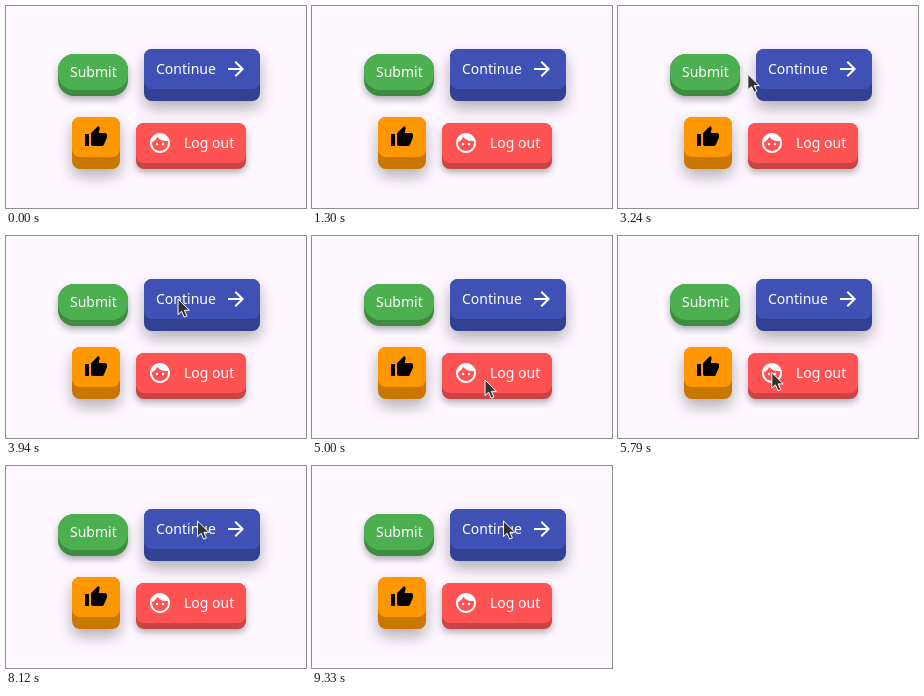
An HTML page for the animation above (9360 ms loop, 300x202 px).

```html
<!DOCTYPE html>
<html lang="en">
<head>
<meta charset="utf-8">
<title>Push buttons</title>
<style>
  html, body { margin: 0; width: 100%; height: 100%; overflow: hidden; background: #fef7ff; }
  .side, .front, .front svg, .front span, #cursor { position: absolute; }
  .front { left: 0; top: 0; width: 100%; border-radius: inherit; color: #fff; }
  .front span { left: 12px; font: 14px/36px "Noto Sans", sans-serif; white-space: pre; }
  .front svg { width: 24px; height: 24px; top: 8px; fill: currentColor; }
  #cursor { left: 0; top: 0; width: 16px; height: 22px; overflow: visible; }
</style>
</head>
<body>
<svg id="cursor"><path d="M0 0V15.6L3.6 12.3 6.2 18.2 8.9 17 6.4 11.3H11.4Z" fill="#333" stroke="#fff" stroke-linejoin="round"/></svg>
<script>
const LOOP = 9360, RAMP = 90;
const ARROW = 'M12 4l-1.41 1.41L16.17 11H4v2h12.17l-5.58 5.59L12 20l8-8z';
const THUMB = 'M1 21h4V9H1v12zm22-11c0-1.1-.9-2-2-2h-6.31l.95-4.57.03-.32c0-.41-.17-.79-.44-1.06L14.17 1 7.59 7.59C7.22 7.95 7 8.45 7 9v10c0 1.1.9 2 2 2h9c.83 0 1.54-.5 1.84-1.22l3.02-7.05c.09-.23.14-.47.14-.73v-2z';
const FACE = 'M10.25 13a1.25 1.25 0 1 1-2.5 0 1.25 1.25 0 0 1 2.5 0zm6 0a1.25 1.25 0 1 1-2.5 0 1.25 1.25 0 0 1 2.5 0zM12 2C6.48 2 2 6.48 2 12s4.48 10 10 10 10-4.48 10-10S17.52 2 12 2zm0 18c-4.41 0-8-3.59-8-8 0-.29.02-.58.05-.86 2.36-1.05 4.23-2.98 5.21-5.37C11.07 8.33 14.05 10 17.42 10c.78 0 1.53-.09 2.25-.26.21.71.33 1.47.33 2.26 0 4.41-3.59 8-8 8z';

// clicks: [press, release] in ms
const buttons = [
  { x: 52, y: 48, w: 70, h: 36, depth: 6, r: 16, face: '#4caf50', side: '#3d8c40', text: 'Submit', clicks: [[2600, 2800]] },
  { x: 138, y: 43, w: 116, h: 40, depth: 12, r: 8, face: '#3f51b5', side: '#324191', text: 'Continue', icon: ARROW, iconX: 80, clicks: [[3600, 3790], [7800, 8000]] },
  { x: 66, y: 111, w: 48, h: 40, depth: 12, r: 8, face: '#ff9800', side: '#c87700', icon: THUMB, iconX: 12, ink: '#000', clicks: [[6290, 6480]] },
  { x: 130, y: 117, w: 110, h: 40, depth: 6, r: 8, face: '#ff5252', side: '#c94545', text: 'Log out', textX: 48, icon: FACE, iconX: 12, clicks: [[5150, 5350]] }
];

// moves: [start, end, x, y]
const moves = [
  [0, 1, 150, 210],
  [1350, 2300, 92, 73],
  [3000, 3500, 172, 63],
  [4050, 4800, 173, 144],
  [5600, 6200, 93, 113],
  [6900, 7600, 191.5, 55]
];

const cursor = document.getElementById('cursor');
const clamp = v => Math.max(0, Math.min(1, v));
const smooth = v => v * v * (3 - 2 * v);

for (const b of buttons) {
  const side = b.el = document.createElement('div');
  side.className = 'side';
  side.style.cssText = `left:${b.x}px;width:${b.w}px;border-radius:${b.r}px;background:${b.side}`;
  const icon = b.icon ? `<svg viewBox="0 0 24 24" style="left:${b.iconX}px"><path d="${b.icon}"/></svg>` : '';
  const label = b.text ? `<span style="left:${b.textX || 12}px;line-height:${b.h}px">${b.text}</span>` : '';
  side.innerHTML = `<div class="front" style="height:${b.h}px;background:${b.face};color:${b.ink || '#fff'}">${label}${icon}</div>`;
  document.body.insertBefore(side, cursor);
}

function drawButton(b, t) {
  const pressed = Math.max(...b.clicks.map(([down, up]) =>
    smooth(clamp((t - down) / RAMP) * clamp((up + RAMP - t) / RAMP))));
  const lift = b.depth * (1 - pressed);
  const s = b.el.style;
  s.top = b.y + b.depth - lift + 'px';
  s.height = b.h + lift + 'px';
  s.boxShadow = `0 ${lift * .6}px ${lift * 1.2}px rgba(0,0,0,.3)`;
}

function drawCursor(t) {
  let [, , x, y] = moves[0];
  for (const [start, end, toX, toY] of moves) {
    const k = smooth(clamp((t - start) / (end - start)));
    x += (toX - x) * k;
    y += (toY - y) * k;
  }
  cursor.style.transform = `translate(${x}px,${y}px)`;
}

const began = performance.now();
function frame() {
  const t = (performance.now() - began) % LOOP;
  buttons.forEach(b => drawButton(b, t));
  drawCursor(t);
  requestAnimationFrame(frame);
}
frame();
</script>
</body>
</html>
```
